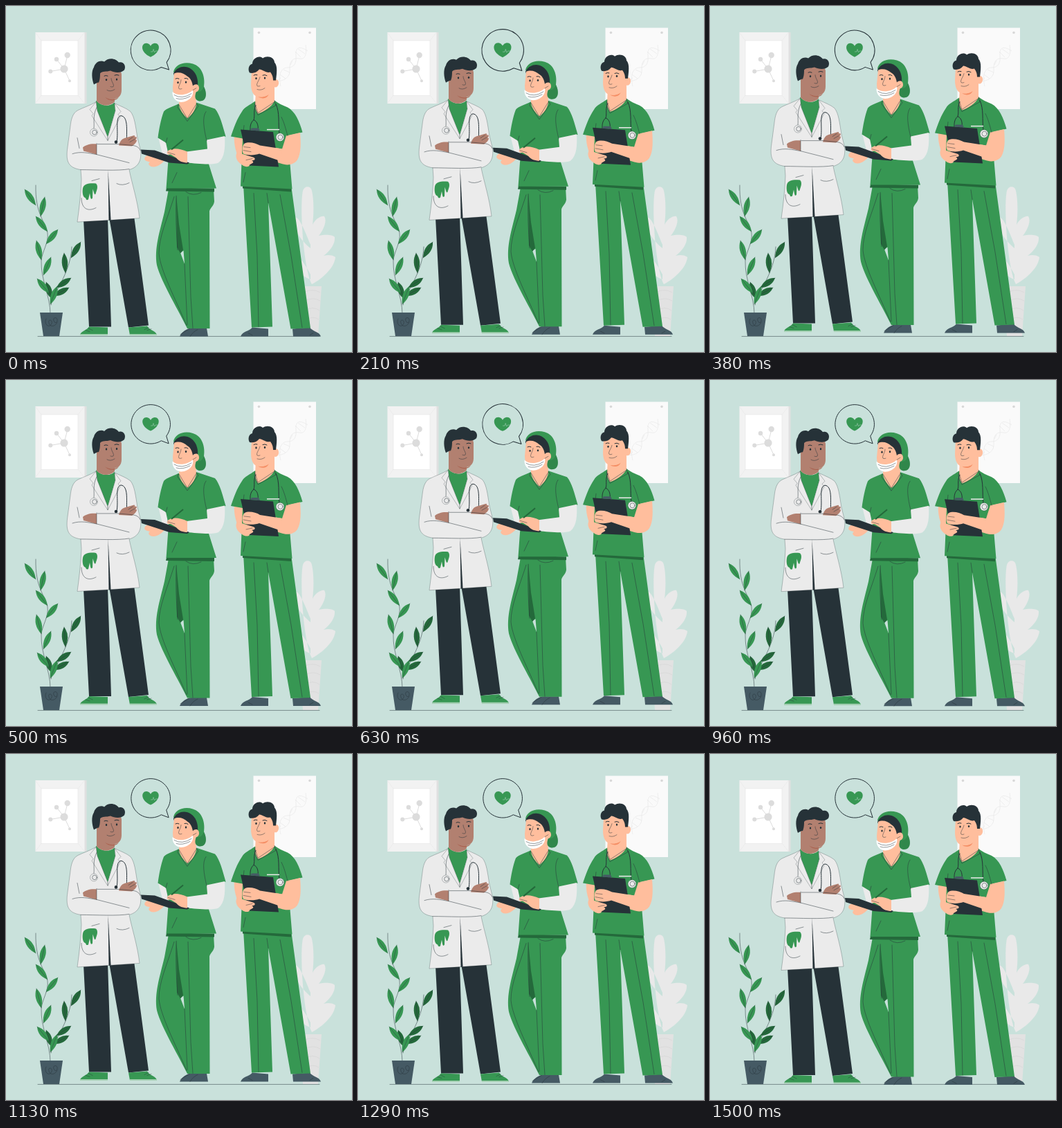
Write an HTML page that moves like this. It is 500 px wide and 500 px high and loops after 1540 ms.

```html
<!DOCTYPE html>
<html lang="en">
<meta charset="utf-8">
<title>Medical team</title>
<style>
  html, body { margin: 0; width: 100%; height: 100%; overflow: hidden; background: #c9e1db; }
  svg { display: block; width: 100%; height: 100%; }
  .g { fill: #379753; } .k { fill: #24693b; } .d { fill: #263238; } .n { fill: #455a64; }
  .w { fill: #ebebeb; } .s { fill: #ffbe9d; } .b { fill: #b28070; } .p { fill: #e9e9e9; }
  .l { fill: none; stroke: #263238; stroke-width: .5; stroke-linecap: round; stroke-linejoin: round; }
  .o { stroke: #263238; stroke-width: .4; stroke-opacity: .7; stroke-linejoin: round; }
  .t { stroke-width: 1; }
  .f { fill: none; stroke: #e9e9e9; stroke-width: .7; }
</style>
<svg viewBox="0 0 500 500">
  <!-- wall pictures -->
  <path fill="#e0e0e0" d="M112 38H116.500V141H112Z"/>
  <path fill="#f2f2f2" d="M42.500 38H113.500V141H42.500Z"/>
  <path class="f" d="M42.500 38L51 50M113.500 38L104 50M42.500 141L51 129M113.500 141L104 129"/>
  <path fill="#fff" stroke="#e4e4e4" stroke-width=".6" d="M51 50H104V129.500H51Z"/>
  <path fill="none" stroke="#dcdcdc" d="M64 94.500L84 91L89 71M73 77L84 91L92 108"/>
  <g fill="#dcdcdc">
    <circle cx="84" cy="91" r="5.600"/><circle cx="88.700" cy="71" r="4.200"/><circle cx="73" cy="77" r="3.200"/>
    <circle cx="64.300" cy="94.500" r="3"/><circle cx="92" cy="108.300" r="2"/>
  </g>
  <path fill="#fafafa" d="M357.500 31.500H448V149H357.500Z"/>
  <g fill="#d8d8d8"><circle cx="365.500" cy="38.500" r="1.800"/><circle cx="439" cy="38.500" r="1.800"/></g>
  <path class="f" d="M388 108C400 110 411 104 410 92S415 74 424 76S435 68 433 56M397 116C393 100 397 89 407 89S420 82 419 71S424 57 436 65M392 108L397 104M396 99L404 105M401 92L410 96M411 85L414 79M418 66L426 74M422 62L432 69"/>

  <!-- pale plant -->
  <path class="p" d="M442 402C430 380 424 290 429 267C431 260 440 259 442 267C445 280 445 300 443 316C447 308 455 303 460 304C464 310 460 322 452 332C460 330 472 330 475 334C476 344 468 354 459 361C465 359 473 360 476 363C475 377 458 394 442 402ZM440 345C430 320 422 302 417 306C412 318 425 338 440 350ZM440 388C430 368 416 352 410 358C411 374 425 390 440 395Z"/>
  <path fill="#e2e2e2" d="M424 405H456L451 477H429Z"/>
  <path fill="none" stroke="#d6d6d6" stroke-width=".7" d="M432 413Q444 408 454 414M432 426Q444 420 454 426M432 440Q444 433 453 440M432 454Q444 447 452 453"/>

  <path class="l" d="M46 477.400H453"/>

  <!-- speech bubble -->
  <g id="bubble">
    <path class="l t" stroke-width=".7" d="M224 88A28.300 28.300 0 1 1 231.700 81L235 91.500Z"/>
    <path class="g" d="M209 73.500C194 67 195 54 203 54C207 54 209 58 209 58C209 58 211 54 215 54C223 54 224 67 209 73.500Z"/>
    <path d="M209 66L212 66L213 62.500L214.500 67L216 65H220" fill="none" stroke="#c9e1db" stroke-width=".4"/>
  </g>

  <g id="team">
    <!-- doctor -->
    <path class="d" d="M112 308L147 305L152 463L120 463ZM149 305L185 303L206 461L177 464Z"/>
    <path class="g" d="M120 463L147 464V475H107C108 469 116 469 120 463ZM177 464L204 462C207 468 217 469 218 475H179Z"/>
    <path fill="#a5d0b3" d="M107 473.500H147V475.500H107ZM179 473.500H218V475.500H179Z"/>
    <path class="l" stroke-dasharray="1 1" d="M115 468L121 470M119 465L125 468M204 468L210 466M200 467L206 464"/>
    <path class="w o" d="M130 138C122 143 112 146 104 150C96 154 94 164 93 173L88.500 207C87 223 89 233 108 236L109 250C108 272 106 290 103 311.500L148 309L193 306C190 280 182 256 178 236C192 232 196 222 194.500 208L190 190C187 172 186 160 180 152C174 147 165 144 157 140Z"/>
    <path class="d" d="M147.500 236L151.500 309L148.500 309.500Z"/>
    <path class="g" d="M130 136C138 145 150 145 157 139L158 151L147 189L131 150Z"/>
    <path class="b" d="M131 110L157 125V138C150 145 138 145 131 137Z"/>
    <path fill="#a9614f" d="M143 131C151 136 157 136 163 131C160 137 149 138 143 131Z"/>
    <path class="b" d="M133 96C134 85 166 84 167 98V121C167 129 162 134 154 134C142 134 135 126 131 110Z"/>
    <path class="d" d="M127 113C124 105 123 94 127 88C129 80 137 77 142 80C148 73 159 75 163 81C170 79 174 86 171 92C166 97 157 96 151 93C145 95 139 93 136 97C136 104 135 108 134 110C131 110 129 112 127 113Z"/>
    <path class="l t" d="M142 100.500Q144 99 147 100.500M157 99.500Q160 98 163 99.500"/>
    <path class="l" d="M152 104C152 109 157 113 155 116Q153 117 151 116M146 121Q151 124 157 120"/>
    <g class="d"><ellipse cx="145" cy="106" rx="1.200" ry="1.600"/><ellipse cx="160" cy="105.500" rx="1.200" ry="1.600"/></g>
    <path class="w o" d="M130 138L121 149L126 155L124 158L147 194V189L132 151ZM157 140L158 151L147 189V194L165 160L162 156L166 152Z"/>
    <path class="l" d="M131 146C125 158 128 168 127 176"/>
    <path class="l t" d="M160 196C163 180 157 160 166 158C177 159 174 180 174.500 193"/>
    <circle class="d" cx="159" cy="196" r="2.300"/>
    <circle class="w o" cx="127" cy="182" r="5.500"/><circle class="l" cx="128" cy="182" r="3.300"/>
    <path class="b" d="M131 199C123 198 115 200 111 204L112 209L131 214ZM163 201C165 194 168 191 173 190L185 186.500Q187 187 186 189L188 188.500Q190 190 187 193L189 193C189 197 185 200 182 202Z"/>
    <path class="l" d="M108 236C130 236 162 238 178 235M96 213C108 209 119 212 131 214L178 226M131 198L131 214M132 199H163L184 201C190 202 193 205 194 208M103 190L106 205M183 189L177 193M186 192L179 196"/>
    <path class="l" d="M124 252L135 249M109 277C109 293 119 297 130 291M160 256Q168 260 178 255"/>
    <path class="g" d="M111 263C112 256 122 255 130 256C134 260 131 266 129.500 271Q128 273 127 269L125.500 264L125 277Q123 280 122 276L121 270L119 279Q116 281 115 277C111 276 110 269 111 263Z"/>

    <!-- nurse with cap -->
    <path class="n" d="M251 477C254 470 261 466 267 465H290L292 477Z"/>
    <path class="l" d="M252 474L265 466M266 477Q270 470 277 467"/>
    <path class="g" d="M235 264H300L301 282C300 289 295 291 294 296L294.500 465.500H262C252 444 224 398 218 374C214 350 222 326 229 297Z"/>
    <path fill="#c9e1db" d="M252 356L256.500 353L258 372Z"/>
    <path class="k" d="M246 272L250 315L256 352L252 357L247 348ZM232 262L301 263V268L231 267Z"/>
    <path class="l" d="M263 275L267 420L270 465M246 274C245 300 246 326 248 352M258 372L262 460M243 275C232 310 221 333 221 357C223 381 244 421 261 461M260 268Q270 275 282 269"/>
    <path class="w" d="M220 189L233 193V217L226 213Z"/>
    <path class="g" d="M249 141C241 145 232 147 228 152C224 162 221 178 219.500 190L231 197L235 215L231.500 263H304L293 228L291 195L317.500 188C313 172 309 156 302 148C293 145 284 142 275 139Z"/>
    <path class="w" d="M290 193L316 187.500C317 204 316 219 307 226C298 230 275 227 261 226V210L291 206Z"/>
    <path class="s" d="M250 130L274 122L275 142C273 152 267 158 262 162C257 157 251 150 250 142Z"/>
    <path class="l" d="M249 142L248 146L262 166L278 144L275 140M250 142L262 162L275 141M289 152C283 160 286 177 290 194M231 197L233 190M247 240L240 255"/>
    <path class="g" d="M242 95C244 84 257 79 270 83C284 87 288 103 286 116C291 126 290 137 280 137C273 136 272 131 275 123Z"/>
    <path class="k" d="M275 123C281 125 284 121 286 116C291 126 290 137 280 137C274 136 272 131 275 123Z" opacity=".35"/>
    <path class="d" d="M242 97C249 83 268 84 275 100C278 108 278 116 274 122H262L244 103Z"/>
    <path class="s" d="M243 97C249 94 257 96 262 101C267 104 269 109 270 115C273 111 279 112 279 118C279 123 274 125 271 124C269 133 260 137 253 137C245 136 241 128 241 117Z"/>
    <path class="l t" d="M245 104.500Q247 103 250 104.500M258 104Q261 103 263 105"/>
    <path class="l" d="M253 106C253 111 248 116 250 119Q252 120 254 119"/>
    <g class="d"><ellipse cx="248.500" cy="110" rx="1.200" ry="1.600"/><ellipse cx="260" cy="109.500" rx="1.200" ry="1.600"/></g>
    <path fill="#fff" d="M240.500 123.500C247 130 262 129 270 121C272 130 264 138 253 138.500C245 138 240 131 240.500 123.500Z"/>
    <path class="l" d="M243 128Q254 135 268 126M246 133Q255 136 266 130M270 121L275 118"/>
    <path class="s" d="M226 213C215 212 203 214 201 218C198 222 203 224 208 225C204 227 207 232 213 232C220 232 226 226 230 222Z"/>
    <path class="d" d="M195 207L215 208L265 226L262 228L236 226L196 213Z"/>
    <path class="s" d="M262 210C252 205 241 204 235 208C231 211 232 215 238 214L246 219C250 224 256 226 262 226Z"/>
    <path d="M239 207L256 193" stroke="#24693b" stroke-width="2"/>
    <path class="l" d="M234 211L244 214"/>

    <!-- nurse with folder -->
    <path class="n" d="M339 477C342 469 351 470 356 464L379 466V477ZM414 466L439 464C443 470 453 470 455 477H415Z"/>
    <path class="l" d="M350 472L356 475M444 472L439 475"/>
    <path class="g" d="M343 258H412L440 465L411.500 466L379 284L385 463L355 464Z"/>
    <path class="k" d="M342 257L412 260V268L342 263Z"/>
    <path class="l" d="M358 270L363 360L365 463M396 272L412 360L428 464M379 284L377 270"/>
    <path class="s" d="M330 184L345 187V222L334 214C331 205 329 197 330 184Z"/>
    <path class="g" d="M360 137C352 143 345 145 341 152C334 162 329 176 325 188L342 191L339 260L413.500 264L407 187L428.500 182C424 166 418 152 407 146C400 143 393 140 388 136Z"/>
    <path class="s" d="M405 187L425 182.500C426 196 427 212 421 222C415 230 405 230 397 227L360 216L362 200L399 206Z"/>
    <path class="s" d="M361 122L388 108V137C384 145 372 153 364 155C361 151 360 146 360 141Z"/>
    <path fill="#f58f66" d="M363 129C370 133 377 130 380 126C378 134 368 135 363 129Z"/>
    <path class="s" d="M355 92L386 89L388 106C391 104 395 107 394 112C393 117 389 118 387 116C385 126 377 131 367 131C357 131 354 122 354 112Z"/>
    <path class="d" d="M352 96C349 91 351 84 356 83C356 75 366 70 371 75C378 70 388 74 388 81C393 86 391 98 390 107L386 107C386 101 384 98 382 95C376 97 371 91 366 91C362 96 357 97 352 96Z"/>
    <path class="l t" d="M358 99.500Q360 98 363 99M371 99.500Q374 98 377 100"/>
    <path class="l" d="M367 102C366 107 361 112 363 115Q365 116 367 115M363 120Q369 122 374 118"/>
    <g class="d"><ellipse cx="361.500" cy="104" rx="1.200" ry="1.600"/><ellipse cx="374" cy="103.500" rx="1.200" ry="1.600"/></g>
    <path class="l" d="M360 139L359 145L364 157L390 143L388 136M360 141L364 154L388 138M342 191L344 172M407 187C404 176 402 168 398 160M346 240L343 254"/>
    <path class="l t" d="M361 143C357 150 360 158 358 164C352 169 353 176 353 181M358 164C364 166 365 174 364 181M390 141C396 154 393 168 395 184"/>
    <path d="M377 178H395" stroke="#ebebeb" stroke-width="1.500"/>
    <circle class="w o" cx="396" cy="189" r="5.800"/><circle class="l" cx="396.500" cy="189" r="3.500"/>
    <path class="d" d="M339 178L386 181.500L394 232L351 230Z"/>
    <path class="n" d="M353 179L355 176H365L367 180Z"/>
    <path class="s" d="M399 206L367 201C361 197 350 195 345 198C341 201 341 209 343 213C350 216 361 215 366 213L398 224ZM334 211C330 217 334 225 341 229C346 233 352 232 352 229L357 226Q358 224 355 223L359 222Q361 219 357 218L347 215Z"/>
    <path class="l" d="M343 208L354 210M344 203L353 204M347 222L356 220"/>
  </g>

  <!-- potted plant -->
  <path class="l" d="M64 444C64 420 50 395 51 368C52 355 62 342 60 328C56 310 42 300 43 259M65 432C68 415 94 385 95 348"/>
  <g id="leaves"></g>
  <path class="n" d="M49 443H82L77 477H54Z"/>
  <path class="l" d="M58 452C54 459 62 467 66 459C68 453 60 452 62 458C64 466 74 462 74 455C75 449 67 449 69 455Q71 459 73 457"/>
</svg>
<script>
  const byId = id => document.getElementById(id);

  // A leaf from its base (x, y) to its tip (u, v), with a midrib.
  function leaf(cls, x, y, u, v) {
    const dx = u - x, dy = v - y, k = 8.5 / Math.hypot(dx, dy);
    const side = s => `${x + dx * .55 - s * dy * k} ${y + dy * .55 + s * dx * k}`;
    return `<path class="${cls}" d="M${x} ${y}Q${side(1)} ${u} ${v}Q${side(-1)} ${x} ${y}Z"/>
      <path class="l" style="stroke-width:.4" d="M${x} ${y}L${u} ${v}"/>`;
  }

  const light = [
    [43, 288, 27, 265], [50, 304, 56, 276], [60, 326, 43, 304], [58, 344, 75, 323],
    [51, 367, 44, 339], [54, 389, 65, 363], [62, 415, 45, 394], [64, 431, 74, 405]];
  const dark = [
    [94, 364, 108, 341], [86, 386, 84, 357], [73, 407, 94, 393],
    [66, 423, 58, 399], [69, 419, 91, 407]];
  byId("leaves").innerHTML =
    dark.map(a => leaf("k", ...a)).join("") + light.map(a => leaf("g", ...a)).join("");

  const LOOP = 1540, STEP = 1000 / 24, CYCLE = 1500, LEAD = 30;
  const beats = [[0, 1], [.1, 1.1], [.3, 1], [.4, 1], [.5, 1.1], [.6, 1], [1, 1]];

  function beatScale(p) {
    const i = Math.max(1, beats.findIndex(([at]) => at >= p));
    const [a, from] = beats[i - 1], [b, to] = beats[i];
    return from + (to - from) * (p - a) / (b - a);
  }

  function draw(now) {
    const step = Math.floor((now % LOOP + 4) / STEP);
    const p = Math.min(1, (step * STEP + LEAD) / CYCLE);
    const lift = 10 * (1 - Math.abs(1 - 2 * p));
    byId("team").setAttribute("transform", `translate(0 ${1 - lift})`);
    byId("bubble").setAttribute("transform",
      `translate(209 63.5) scale(${beatScale(p)}) translate(-209 -63.5)`);
    requestAnimationFrame(draw);
  }
  draw(0);
</script>
</html>
```
